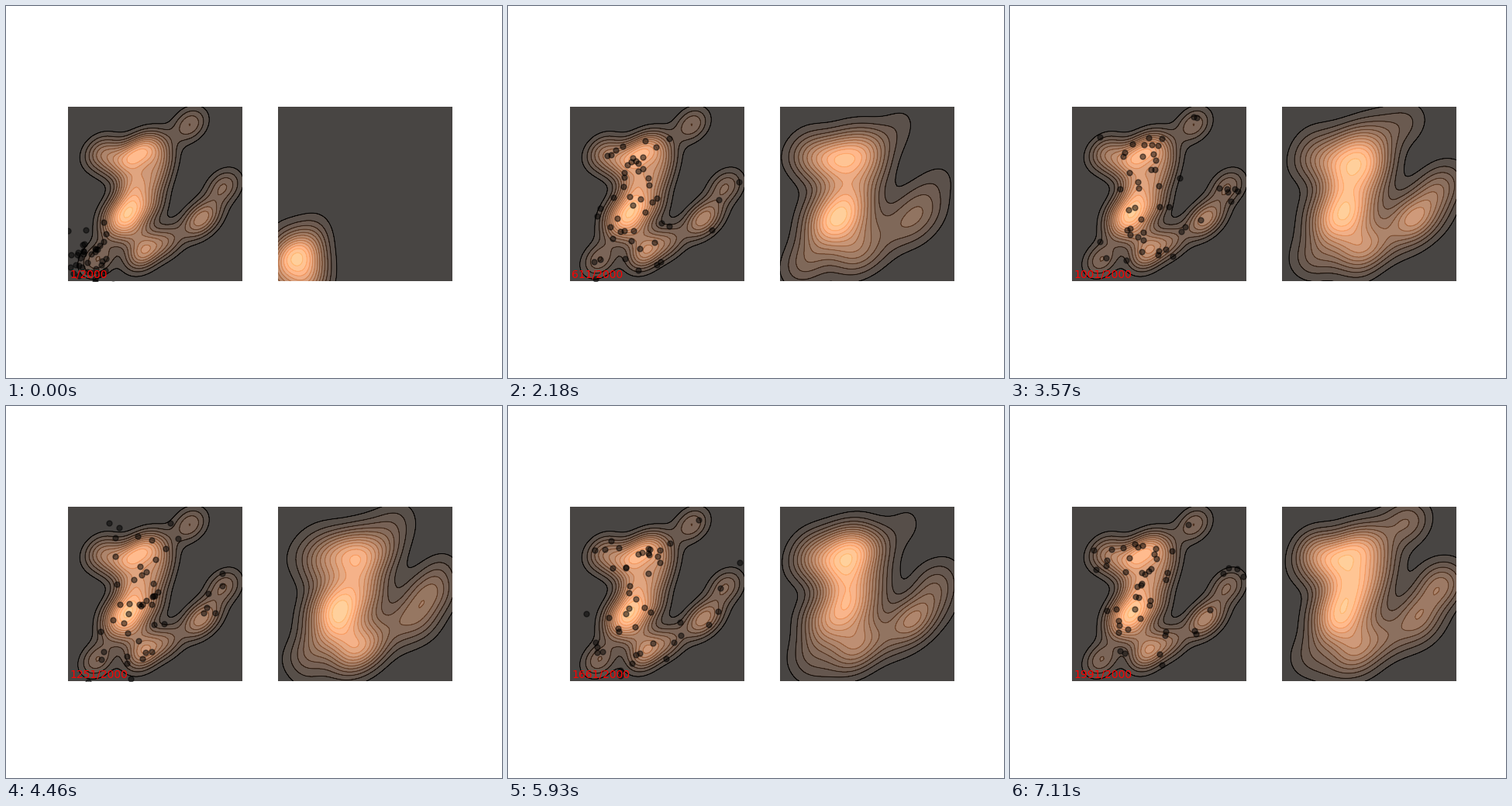
Animation of 640 by 480 pixels, one loop 7150 ms. Source, as a matplotlib script:

```python
import numpy as np
import matplotlib.pyplot as plt
from matplotlib.animation import FuncAnimation

SIDE = 225.45            # panel side in pixels, used as data units
STEPS, STRIDE, TOTAL = 200, 10, 2000
LOOP, TICK, FPS = 7150, 25, 28
WALKERS, WINDOW = 50, 30

# kernel centres of the density being sampled
TARGET = np.array([
    (157, 202), (38, 28), (201, 122), (179, 87), (165, 74), (127, 51),
    (94, 33), (101, 44), (84, 66), (62, 70), (62, 89), (78, 84),
    (84, 98), (82, 115), (85, 133), (104, 97), (110, 128), (117, 153),
    (112, 172), (97, 173), (86, 163), (75, 152), (58, 158), (41, 167)])


def mixture(x, y, centres, major, minor):
    """Sum of Gaussian bumps tilted along the diagonal."""
    dx = x[..., None] - centres[:, 0]
    dy = y[..., None] - centres[:, 1]
    along, across = (dx + dy) / major, (dx - dy) / minor
    return np.exp(-(along**2 + across**2) / 4).sum(-1)


def target(x, y):
    return mixture(x, y, TARGET, 17, 13)


def walk(seed):
    """Metropolis walkers, stored once per displayed step."""
    rng = np.random.default_rng(seed)
    pos = rng.normal((21, 24), 23, (WALKERS, 2))
    here = target(*pos.T)
    path = []
    for it in range((STEPS - 1) * STRIDE + 1):
        if it % STRIDE == 0:
            path.append(pos.copy())
        trial = pos + rng.normal(0, 8, pos.shape)
        there = target(*trial.T)
        ok = rng.random(WALKERS) * here < there
        pos[ok], here[ok] = trial[ok], there[ok]
    return path


def draw_density(ax, z):
    fill = ax.contourf(gx, gy, z, 15, cmap="copper", alpha=0.75)
    lines = ax.contour(gx, gy, z, fill.levels[1:-1], cmap="copper",
                       vmin=fill.levels[1], vmax=fill.levels[-1],
                       linewidths=0.7)
    return fill, lines


axis = np.linspace(0, SIDE, 80)
gx, gy = np.meshgrid(axis, axis)
path = walk(12)
total = np.cumsum([mixture(gx, gy, p, 18, 15) for p in path], axis=0)
starts = np.round(np.arange(STEPS) * 100 / FPS) * 10


def estimate(step):
    """Kernel density of the walkers over the recent window."""
    if step < WINDOW:
        return total[step] / (step + 1)
    return (total[step] - total[step - WINDOW]) / WINDOW


fig, (left, right) = plt.subplots(1, 2, figsize=(6.4, 4.8), dpi=100)
for ax in (left, right):
    ax.set(xlim=(0, SIDE), ylim=(0, SIDE), aspect="equal")
    ax.axis("off")

draw_density(left, target(gx, gy))
dots, = left.plot([], [], "ko", ms=5, alpha=0.5)
label = left.text(0.01, 0.02, "", color="red", fontsize=10, zorder=4,
                  transform=left.transAxes)
shown = {"step": None, "sets": ()}


def update(i):
    step = np.searchsorted(starts, i * TICK + 20, side="right") - 1
    if step == shown["step"]:
        return
    for old in shown["sets"]:
        old.remove()
    shown["sets"] = draw_density(right, estimate(step))
    shown["step"] = step
    dots.set_data(*path[step].T)
    label.set_text(f"{step * STRIDE + 1}/{TOTAL}")


anim = FuncAnimation(fig, update, frames=LOOP // TICK, interval=TICK,
                     repeat=True, repeat_delay=0)
plt.show()
```
